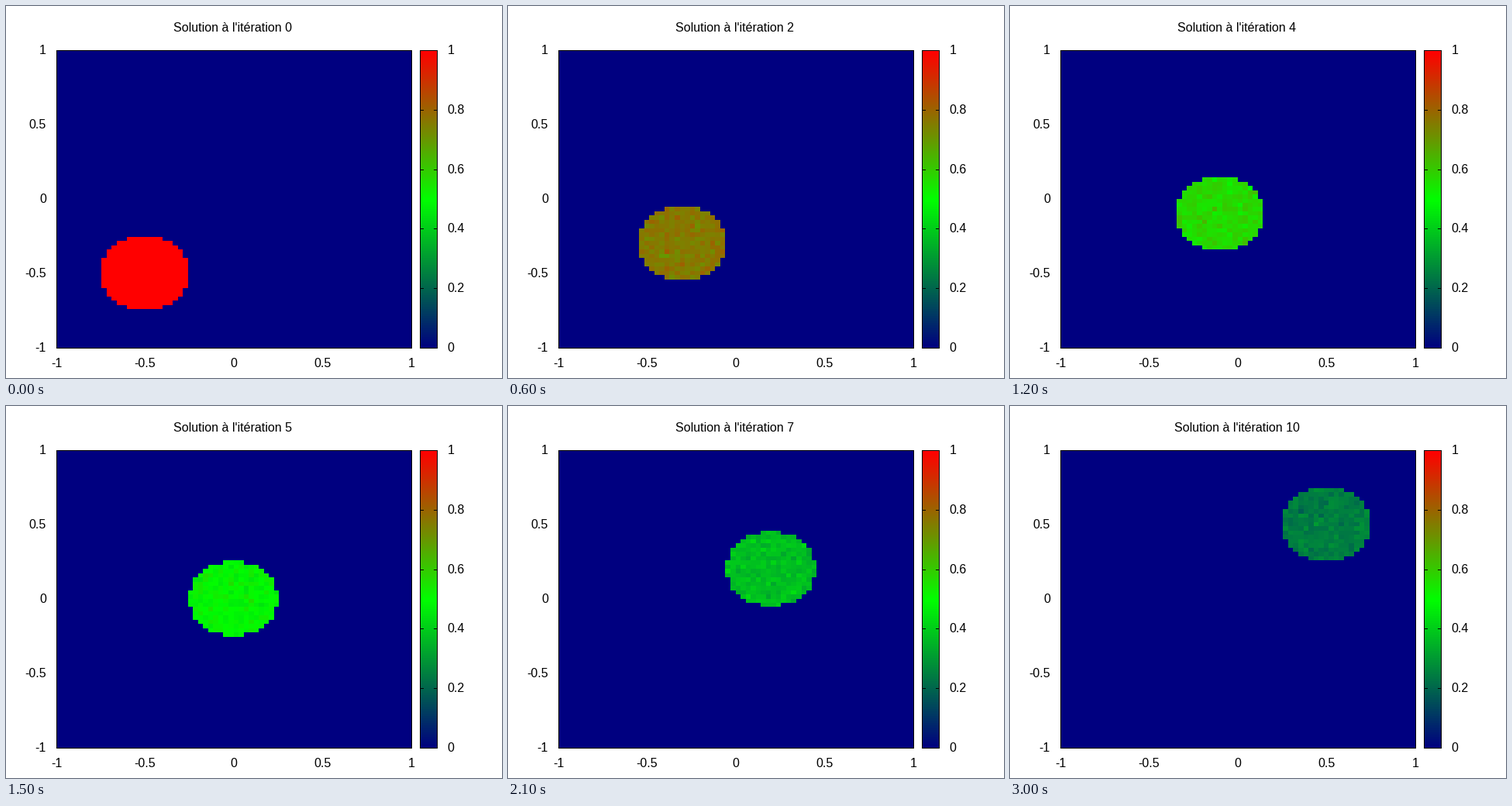
Animation of 640x480 px, one loop 3.3 s. Source, as a matplotlib script:

```python
import numpy as np
import matplotlib.pyplot as plt
from matplotlib.animation import FuncAnimation

W, H, DPI = 640, 480, 100
LEFT, RIGHT, TOP, BOTTOM = 65, 523, 57, 441
BAR_L, BAR_R = 534, 556
CELLS = 70
RADIUS = 0.25
DECAY = 0.87
FRAMES, INTERVAL = 11, 300
BLACK = (0, 0, 0)

plt.rcParams["font.family"] = "Liberation Sans"
plt.rcParams["font.size"] = 16 * 72 / DPI


def palette(v):
    """Dark blue -> green -> red, quantised to 128 shades."""
    v = np.minimum(np.floor(np.asarray(v) * 128), 127) / 127
    stops = [0, 0.5, 1]
    channels = [(0, 0, 255), (0, 255, 0), (128, 0, 0)]
    rgb = [np.interp(v, stops, c) for c in channels]
    return np.stack(rgb, axis=-1).astype(np.uint8)


def outline(img, x0, x1, y0, y1):
    img[y0:y1 + 1, [x0, x1]] = BLACK
    img[[y0, y1], x0:x1 + 1] = BLACK


def cell_sizes(start, end):
    """Whole-pixel sizes of the cells between two pixel positions."""
    edges = np.floor(start + (end - start) * np.arange(CELLS + 1) / CELLS)
    return np.diff(edges).astype(int)


def make_background():
    img = np.full((H, W, 3), 255, np.uint8)
    rows = np.arange(TOP, BOTTOM + 1)
    shades = palette((BOTTOM - rows) / (BOTTOM - TOP))
    img[TOP:BOTTOM + 1, BAR_L:BAR_R + 1] = shades[:, None]
    for v in (0.2, 0.4, 0.6, 0.8):
        y = round(BOTTOM - v * (BOTTOM - TOP))
        img[y, BAR_L:BAR_L + 5] = BLACK
        img[y, BAR_R - 4:BAR_R + 1] = BLACK
    outline(img, BAR_L, BAR_R, TOP, BOTTOM)
    return img


COL_W = cell_sizes(LEFT, RIGHT)
ROW_H = cell_sizes(TOP, BOTTOM)
BACKGROUND = make_background()
centres = -1 + (np.arange(CELLS) + 0.5) * 2 / CELLS
X, Y = np.meshgrid(centres, centres[::-1])


def solution(n):
    """Disc carried along the diagonal, decaying, with sampling noise."""
    c = -0.5 + 0.1 * n
    level = DECAY ** n
    spread = 0.045 * np.sqrt(level * (1 - level))
    noise = np.random.default_rng(n).normal(0, 1, X.shape)
    inside = (X - c) ** 2 + (Y - c) ** 2 < RADIUS ** 2
    return np.where(inside, np.clip(level + spread * noise, 0, 1), 0)


def picture(n):
    img = BACKGROUND.copy()
    cells = palette(solution(n))
    img[TOP:BOTTOM, LEFT:RIGHT] = cells.repeat(ROW_H, 0).repeat(COL_W, 1)
    outline(img, LEFT, RIGHT, TOP, BOTTOM)
    return img


fig = plt.figure(figsize=(W / DPI, H / DPI), dpi=DPI, facecolor="white")
ax = fig.add_axes([0, 0, 1, 1])
ax.axis("off")
image = ax.imshow(picture(0), extent=(0, W, H, 0), aspect="auto",
                  interpolation="nearest")


def label(x, y, text, ha):
    return ax.text(x, y, text, ha=ha, va="baseline", color="black")


title = label(292.5, 33, "", "center")
for v in (-1, -0.5, 0, 0.5, 1):
    t = (v + 1) / 2
    label(LEFT + t * (RIGHT - LEFT), 466, f"{v:g}", "center")
    label(52, BOTTOM + 5 - t * (BOTTOM - TOP), f"{v:g}", "right")
for v in (0, 0.2, 0.4, 0.6, 0.8, 1):
    label(569.5, round(BOTTOM + 5 - v * (BOTTOM - TOP)), f"{v:g}", "left")


def update(n):
    image.set_data(picture(n))
    title.set_text(f"Solution à l'itération {n}")
    return image, title


anim = FuncAnimation(fig, update, frames=FRAMES, interval=INTERVAL,
                     repeat=True, repeat_delay=0, blit=False)
plt.show()
```
